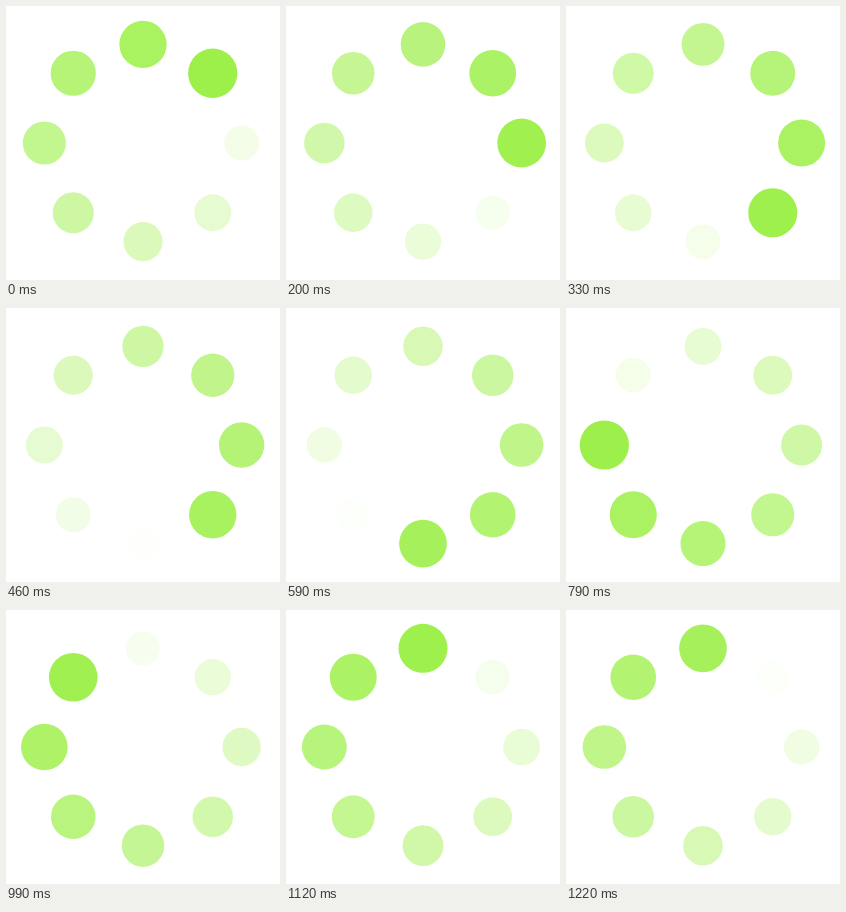
An HTML page that plays this animation: 274x274 px, repeating every 1250 ms.

```html
<!DOCTYPE html>
<html lang="en">
<head>
<meta charset="utf-8">
<title>Loading spinner</title>
<style>
  html, body { margin: 0; width: 100%; height: 100%; overflow: hidden; background: #fff; }
  svg { display: block; width: 100vw; height: 100vh; }
</style>
</head>
<body>
<svg id="stage" viewBox="0 0 274 274" fill="#9df04a"></svg>
<script>
  const LOOP = 1250, STEPS = 38, COUNT = 8;
  const CENTER = 137, RING = 98.64, DOT = 16.44, GROWTH = 0.5;
  const stage = document.getElementById('stage');

  // Dots run clockwise from the upper right, each an eighth of a loop later.
  const dots = Array.from({ length: COUNT }, (_, i) => {
    const dot = document.createElementNS('http://www.w3.org/2000/svg', 'circle');
    const angle = (i - 1) * 2 * Math.PI / COUNT;
    dot.setAttribute('cx', CENTER + RING * Math.cos(angle));
    dot.setAttribute('cy', CENTER + RING * Math.sin(angle));
    return stage.appendChild(dot);
  });

  // Step starts are rounded to 10 ms, hence the 5 ms lead.
  function progress(ms) {
    const step = Math.floor((ms % LOOP + 5) * STEPS / LOOP);
    return Math.min(step, STEPS - 1) / STEPS;
  }

  function draw(ms) {
    const p = progress(ms);
    dots.forEach((dot, i) => {
      const life = 1 - (p - i / COUNT + 1) % 1;
      dot.setAttribute('r', DOT * (1 + GROWTH * life));
      dot.setAttribute('opacity', life);
    });
  }

  let start;
  function tick(now) {
    start ??= now;
    draw(now - start);
    requestAnimationFrame(tick);
  }
  draw(0);
  requestAnimationFrame(tick);
</script>
</body>
</html>
```
